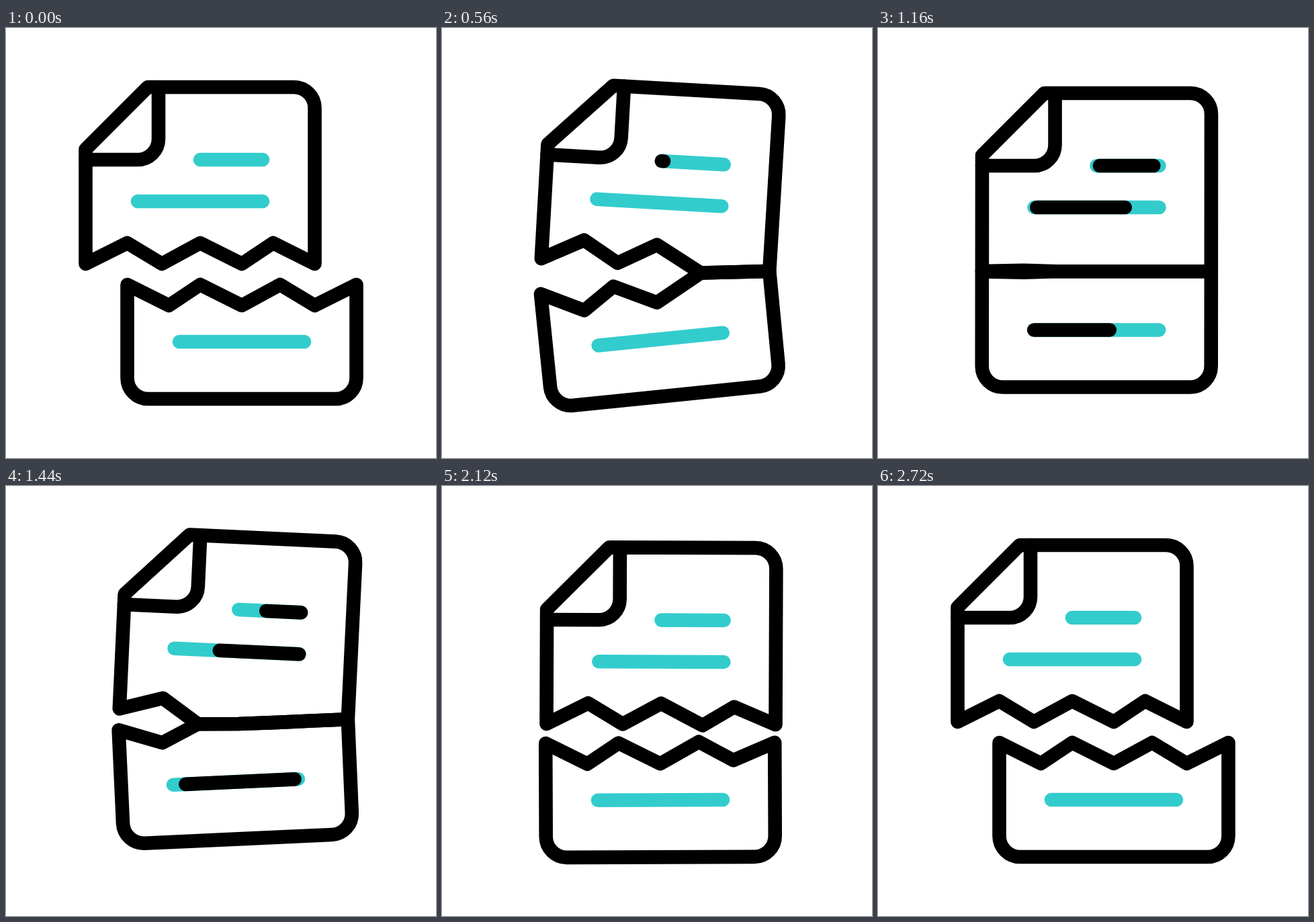
An HTML page with a canvas for the animation above (3000 ms loop, 640x640 px).

```html
<!DOCTYPE html>
<html lang="en">
<head>
<meta charset="utf-8">
<title>Torn document</title>
<style>
html, body { margin: 0; width: 100%; height: 100%; overflow: hidden; background: #fff; }
canvas { display: block; }
</style>
</head>
<body>
<canvas id="stage" width="640" height="640"></canvas>
<script>
const ctx = document.getElementById('stage').getContext('2d');
const LOOP = 3000, STEP = 40;
const TEAL = '#33cccc', BLACK = '#000';
const HALF = 170.5, TOP = 131.5, BOTTOM = 85, TOOTH = 31, RADIUS = 31;

// Torn edges, left to right, around each piece's centre; the lower one is the upper one turned by 180 degrees
const TEETH_X = [-HALF, -108.5, -57, 0, 62, 108.5, HALF];
const UPPER_EDGE = TEETH_X.map((x, i) => [x, TOP - TOOTH * (i % 2)]);
const LOWER_EDGE = TEETH_X.map((x, i) => [-TEETH_X[6 - i], TOOTH * (i % 2) - BOTTOM]);

// Text lines: a black stroke starts to grow at `head`, and is wiped off between `tail` and `done`
const UPPER_LINES = [
  { x: 0, y: -23.5, head: 465, tail: 1048, done: 1900 },
  { x: -93, y: 38.5, head: 602, tail: 1087, done: 1955 }
];
const LOWER_LINES = [{ x: -93, y: 0, head: 675, tail: 1331, done: 1892 }];

function ease(t, from, to) {
  const u = Math.min(1, Math.max(0, (t - from) / (to - from)));
  return u * u * (3 - 2 * u);
}
const hold = (t, a, b, c, d) => ease(t, a, b) - ease(t, c, d);
const pulse = (t, a, b, c) => hold(t, a, b, b, c);
const mix = (a, b, k) => [a[0] + (b[0] - a[0]) * k, a[1] + (b[1] - a[1]) * k];

function placer(x, y, degrees) {
  const c = Math.cos(degrees * Math.PI / 180), s = Math.sin(degrees * Math.PI / 180);
  return (px, py) => [x + px * c - py * s, y + px * s + py * c];
}

function stroke(points, color = BLACK, closed = false) {
  ctx.strokeStyle = color;
  ctx.beginPath();
  points.forEach((p, i) => {
    if (p.corner) ctx.arcTo(...p.corner, ...points[i + 1], RADIUS);
    else ctx.lineTo(...p);
  });
  if (closed) ctx.closePath();
  ctx.stroke();
}

function drawLines(lines, place, t) {
  for (const { x, y, head, tail, done } of lines) {
    const a = place(x, y), b = place(93, y);
    stroke([a, b], TEAL);
    const from = ease(t, tail, done), to = ease(t, head, head + 850);
    if (to > from) stroke([mix(a, b, from), mix(a, b, to)]);
  }
}

function draw(t) {
  const slide = 1 - hold(t, 165, 460, 2150, 2720);
  const meet = pulse(t, 165, 460, 790);
  const joined = hold(t, 460, 790, 1840, 2150);
  const jerk = pulse(t, 1250, 1500, 1840);
  const gape = pulse(t, 1500, 1840, 2150);
  const settle = pulse(t, 1840, 2150, 2720);

  const tilt = 3.09 * jerk + 8.04 * gape;
  const upper = placer(
    325.5 - 36.5 * slide + 23 * jerk + settle,
    219.5 + 9 * joined - 24.5 * jerk - 8 * gape + 3.7 * settle,
    4.15 * meet + tilt);
  const lower = placer(
    325.2 + 25.8 * slide + 19.5 * jerk - 6.7 * gape,
    467 - 17.5 * joined - 10.6 * jerk + 32.3 * gape,
    -7.45 * meet - tilt);

  // Pairs of teeth close onto a common seam from right to left and tear from left to right
  const shift = 4 * Math.sqrt(5.8 * meet + tilt);
  const upperEdge = [], lowerEdge = [];
  for (let i = 0; i < 7; i++) {
    const group = Math.min(2, i >> 1), end = i % 6 === 0;
    const close = 880 - 345 * group, tear = 1225 + 320 * group;
    const k = hold(t, close, close + 320, tear, tear + 320) ** (end ? 3 : 1);
    const a = upper(...UPPER_EDGE[i]), b = lower(...LOWER_EDGE[i]);
    const [x, y] = mix(a, b, 0.5);
    const seamX = end ? x : x + shift;
    const seamY = y + 8 * jerk * Math.min(1, (6 - i) / 3);
    upperEdge.push(mix(a, [seamX - 31 * slide, seamY], k));
    lowerEdge.push(mix(b, [seamX + 31 * slide, seamY], k));
  }

  ctx.fillStyle = '#fff';
  ctx.fillRect(0, 0, 640, 640);
  ctx.lineWidth = 20.6;
  ctx.lineCap = ctx.lineJoin = 'round';

  drawLines(UPPER_LINES, upper, t);
  drawLines(LOWER_LINES, lower, t);
  stroke([
    ...[...upperEdge].reverse(), upper(-HALF, -39), upper(-78, -TOP),
    { corner: upper(HALF, -TOP) }, upperEdge[6]
  ], BLACK, true);
  stroke([upper(-62, -TOP), { corner: upper(-62, -23.5) }, upper(-HALF, -23.5)]);
  stroke([
    ...lowerEdge, { corner: lower(HALF, BOTTOM) }, lower(0, BOTTOM),
    { corner: lower(-HALF, BOTTOM) }, lowerEdge[0]
  ], BLACK, true);
}

function tick() {
  draw(Math.floor(performance.now() % LOOP / STEP) * STEP);
  requestAnimationFrame(tick);
}
tick();
</script>
</body>
</html>
```
